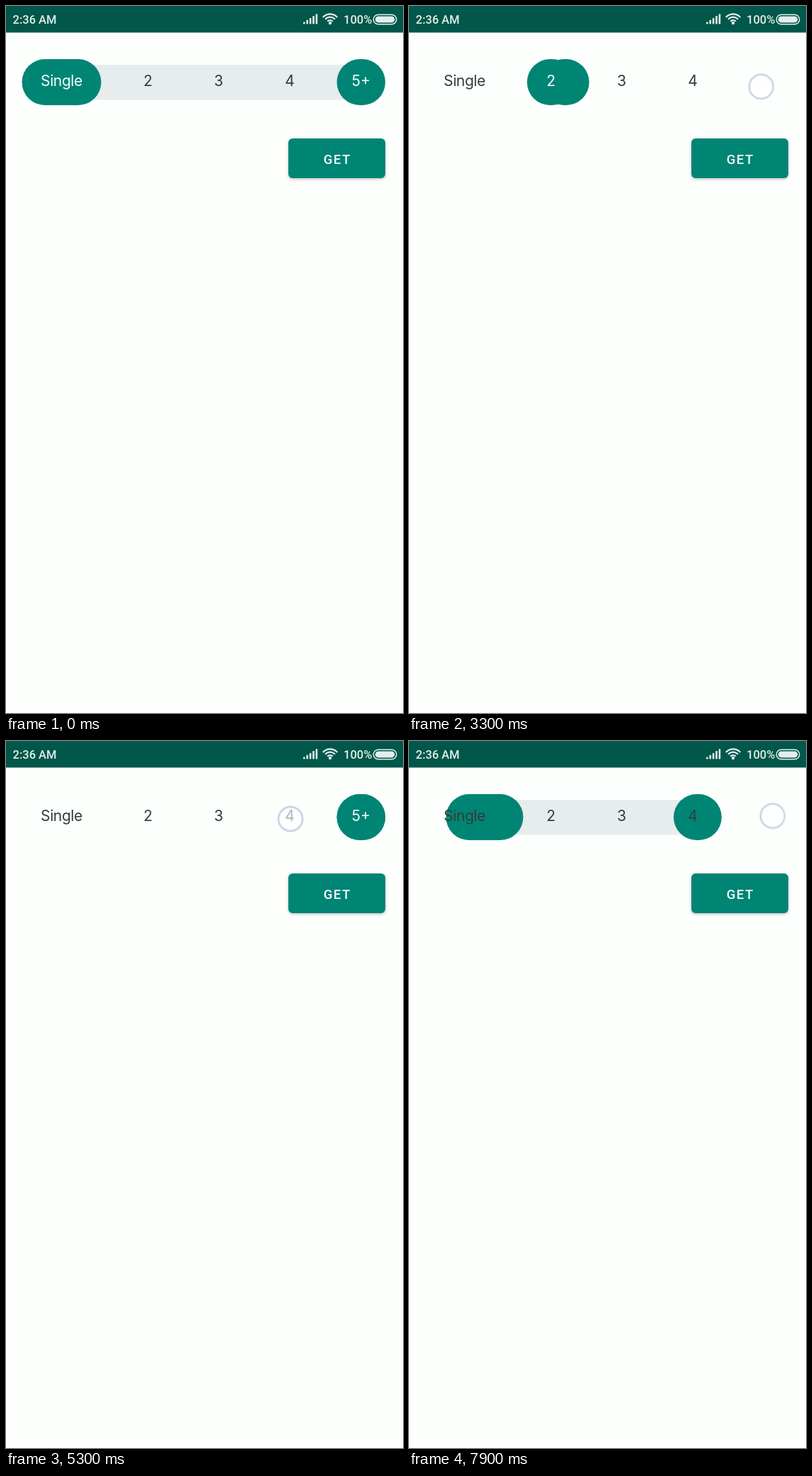
An HTML page with a canvas that plays this animation: 561x998 px, repeating every 8000 ms.

```html
<!DOCTYPE html>
<html lang="en">
<head>
<meta charset="utf-8">
<title>Range picker</title>
<style>
  html, body { margin: 0; width: 100%; height: 100%; overflow: hidden; background: #fdfffd; }
  canvas { display: block; width: 561px; height: 998px; }
</style>
</head>
<body>
<canvas id="stage"></canvas>
<script>
const W = 561, H = 998, LOOP = 8000, STEP = 100;
const SLIDE = 300, PRESS = 110, FADE = 500;
const TEAL = '#008575', PALE = '#e2efec';

const canvas = document.getElementById('stage');
const ctx = canvas.getContext('2d');
const ratio = window.devicePixelRatio || 1;
canvas.width = W * ratio;
canvas.height = H * ratio;

const items = [
  { label: 'Single', left: 22.5, width: 112 },
  { label: '2', left: 166.8, width: 67.6 },
  { label: '3', left: 266.8, width: 67.6 },
  { label: '4', left: 367.2, width: 67.8 },
  { label: '5+', left: 467.5, width: 68.5 }
];

// Each tap is released at `at`; the selection then slides to lo..hi.
const taps = [
  { at: 1600, x: 203, y: 110.5, lo: 1, hi: 1 },
  { at: 3250, x: 497.7, y: 113.8, lo: 1, hi: 4 },
  { at: 4150, x: 481, y: 102, lo: 4, hi: 4 },
  { at: 5400, x: 402, y: 110, lo: 3, hi: 4 },
  { at: 6500, x: 404, y: 111, lo: 3, hi: 3 },
  { at: 7150, x: 93, y: 114, lo: 0, hi: 3 },
  { at: 7850, x: 513.8, y: 105.8, lo: 4, hi: 4 }
];

const clamp = v => Math.max(0, Math.min(1, v));
const ease = p => (1 - Math.cos(Math.PI * clamp(p))) / 2;
const mix = (a, b, p) => a + (b - a) * p;

function pill(x, y, w, h, r, color) {
  ctx.fillStyle = color;
  ctx.beginPath();
  ctx.roundRect(x, y, w, h, r);
  ctx.fill();
}

function text(str, x, y, font, color, spacing = 0, align = 'left') {
  ctx.font = font;
  ctx.fillStyle = color;
  ctx.letterSpacing = spacing + 'px';
  ctx.textAlign = align;
  ctx.fillText(str, x, y);
}

function drawStatusBar() {
  ctx.fillStyle = '#00574a';
  ctx.fillRect(0, 0, W, 37.5);
  const font = '500 16.5px Roboto, sans-serif';
  text('2:36 AM', 9.5, 25, font, PALE);
  text('100%', 477, 25, font, PALE);

  for (let i = 0; i < 5; i++) {
    const h = 3 + i * 2.8;
    pill(420 + i * 4.4, 25.5 - h, 2.6, h, 0.8, PALE);
  }

  ctx.strokeStyle = PALE;
  ctx.lineWidth = 2.2;
  for (const r of [5, 9.3, 13.6]) {
    ctx.beginPath();
    ctx.arc(458, 25, r, -Math.PI * 0.77, -Math.PI * 0.23);
    ctx.stroke();
  }
  ctx.fillStyle = PALE;
  ctx.beginPath();
  ctx.arc(458, 24, 2.2, 0, Math.PI * 2);
  ctx.fill();

  ctx.lineWidth = 1.5;
  ctx.beginPath();
  ctx.roundRect(519.2, 12.2, 32.6, 13.6, 6.8);
  ctx.stroke();
  pill(521.7, 14.6, 27.6, 8.8, 4.4, PALE);
}

function drawButton() {
  ctx.save();
  ctx.shadowColor = 'rgba(0,0,0,0.28)';
  ctx.shadowBlur = 4 * ratio;
  ctx.shadowOffsetY = 1.2 * ratio;
  pill(399, 187, 137, 56, 6, TEAL);
  ctx.restore();
  text('GET', 468.3, 222.5, '500 18.5px Roboto, sans-serif', '#f4fbf9', 1.6, 'center');
}

function thumb(from, to, p) {
  const a = items[from], b = items[to];
  return { left: mix(a.left, b.left, p), width: mix(a.width, b.width, p) };
}

function drawPicker(t) {
  let prev = { lo: 0, hi: 4 }, now = prev, p = 1;
  for (const tap of taps) {
    if (t < tap.at) break;
    prev = now;
    now = tap;
    p = ease((t - tap.at) / SLIDE);
  }
  const lo = thumb(prev.lo, now.lo, p), hi = thumb(prev.hi, now.hi, p);
  const start = lo.left + lo.width / 2, end = hi.left + hi.width / 2;
  ctx.fillStyle = '#e7ecec';
  ctx.fillRect(start, 83, end - start, 49.5);
  for (const th of [lo, hi]) pill(th.left, 75, th.width, 65, 32.5, TEAL);

  items.forEach((item, i) => {
    const chosen = i === now.lo || i === now.hi;
    text(item.label, item.left + item.width / 2, 113, '400 21px Inter, sans-serif',
      chosen ? '#f6fffc' : '#333b3b', i ? 0 : -0.4, 'center');
  });
}

function drawTouch(t) {
  for (const tap of taps) {
    const age = t - tap.at;
    if (age < -PRESS || age >= FADE) continue;
    ctx.save();
    ctx.globalAlpha = age < 0 ? 1 : 1 - age / FADE;
    ctx.beginPath();
    ctx.arc(tap.x, tap.y, 17, 0, Math.PI * 2);
    ctx.fillStyle = 'rgba(255,255,255,0.62)';
    ctx.fill();
    ctx.lineWidth = 4;
    ctx.strokeStyle = 'rgba(150,165,205,0.18)';
    ctx.stroke();
    ctx.lineWidth = 2;
    ctx.strokeStyle = 'rgba(150,165,205,0.42)';
    ctx.stroke();
    ctx.restore();
  }
}

function draw(t) {
  ctx.setTransform(ratio, 0, 0, ratio, 0, 0);
  ctx.fillStyle = '#fdfffd';
  ctx.fillRect(0, 0, W, H);
  drawStatusBar();
  drawButton();
  drawPicker(t);
  drawTouch(t);
}

const begin = performance.now();
function tick() {
  const t = (performance.now() - begin) % LOOP;
  draw(Math.floor(t / STEP) * STEP);
  requestAnimationFrame(tick);
}
tick();
</script>
</body>
</html>
```
